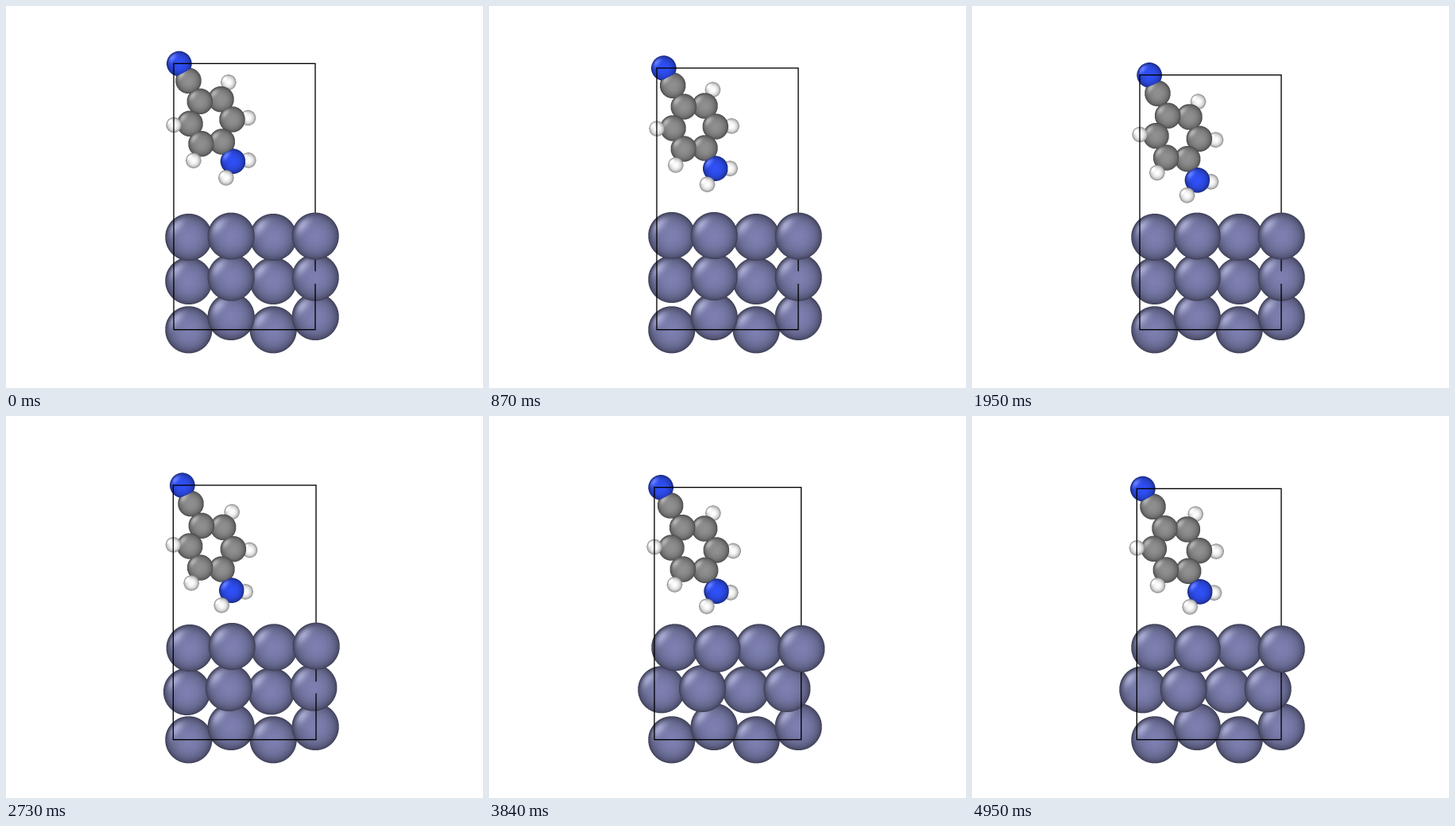
Animation, 600 px wide and 480 px high, one loop 5.01 s. Source, as a matplotlib script:

```python
import numpy as np
import matplotlib.pyplot as plt
from matplotlib.animation import FuncAnimation

W, H, DPI = 600, 480, 100
FRAMES, LAST = 167, 165
SS = 3                                # supersampling
X0, Y0, RW, RH = 170, 45, 270, 405    # region the model can reach

LIGHT = np.array([-1.8, -1.5, -0.2])
LIGHT /= np.linalg.norm(LIGHT)


def make_ball(r, rgb):
    """Shaded sphere: depth bump and colour on the fine grid."""
    n = int(r * SS) + 1
    v = np.arange(-n, n + 1) / (r * SS)
    x, y = np.meshgrid(v, v)
    d2 = x * x + y * y
    nz = np.sqrt(np.clip(1 - d2, 0, 1))
    facing = x * LIGHT[0] + y * LIGHT[1] + nz * LIGHT[2]
    spec = 0.25 * np.clip(2 * facing * nz - LIGHT[2], 0, 1) ** 6
    col = np.array(rgb) / 255 * (0.4 + 0.6 * nz)[..., None] + spec[..., None]
    depth = np.where(d2 <= 1, nz * r, -np.inf)
    return n, depth.astype("f4"), np.clip(col, 0, 1).astype("f4")


BALLS = {
    "M": make_ball(29.6, (125, 128, 176)),
    "C": make_ball(16.3, (144, 144, 144)),
    "N": make_ball(15.8, (48, 80, 248)),
    "H": make_ball(9.7, (255, 255, 255)),
}


def smooth(t, start, stop):
    u = np.clip((t - start) / (stop - start), 0, 1)
    return u * u * (3 - 2 * u)


def bump(t, mid, width):
    return np.exp(-((t - mid) / width) ** 2)


def build_molecule():
    """Atoms as (kind, along axis, across ring, wag), lengths in angstrom."""
    parts = [("N", -4, 0, 0), ("C", -2.83, 0, 0), ("N", 2.77, 0, 0),
             ("H", 3.3, 0.87, 1), ("H", 3.3, -0.87, 1)]
    for k in range(6):
        a, p = -np.cos(k * np.pi / 3), np.sin(k * np.pi / 3)
        parts.append(("C", 1.4 * a, 1.4 * p, 0))
        if k % 3:
            parts.append(("H", 2.46 * a, 2.46 * p, 0))
    return parts


MOLECULE = build_molecule()
KINDS = [m[0] for m in MOLECULE]
LOCAL = np.array([(1, *m[1:]) for m in MOLECULE])
MOL_Z = -60 - 8.4 * LOCAL[:, 2] + 1.5 * abs(LOCAL[:, 1])

# Poses: ring centre, then the screen vectors of axis, ring width and wag
START = np.array([(257.7, 144.9), (10, 18.1), (16.1, -12.6), (0, 0)])
MIDDLE = np.array([(258.6, 164.8), (8.9, 19.5), (17.25, -9.7), (-2.6, 0)])
END = np.array([(257.2, 167.8), (10.6, 19.1), (17.3, -10), (-3, 0)])


def slide(t):
    return 0.78 * smooth(t, 82, 114) + 0.22 * smooth(t, 105, 165)


def molecule(t):
    drop = smooth(t, 14, 50)
    sink = np.clip((t - 86) / 64, 0, 1)
    pose = START + drop * (MIDDLE - START) + (END - MIDDLE) * (slide(t), sink)
    return LOCAL @ pose


def slab(t):
    """Three layers of four; odd columns stand nearer and a little higher."""
    settle = smooth(t, 95, 135)
    heave = 3 * bump(t, 105, 12) - 2.2 * bump(t, 35, 20)
    for k in range(4):
        near = k % 2
        x, z = 229.8 + 53.05 * k, -31 * (1 - near)
        lift = heave * 0.4 ** k
        yield "M", x, 406.8 - 16.4 * near, z - 50
        yield ("M", x - 16 * slide(t) + settle * (0.7 - 1.5 * near),
               345.5 - 4.5 * near + lift + settle * (3.5 * near - 2), z - 28.5)
        yield ("M", x + 5.2 * bump(t, 116.5, 21),
               290.5 - 1.5 * near + lift + 3.7 * settle * near, z)


def atoms(t):
    mol = [(k, x, y, z) for k, (x, y), z in zip(KINDS, molecule(t), MOL_Z)]
    return list(slab(t)) + mol


def sub(x, y):
    return round((x - X0) * SS), round((y - Y0) * SS)


def render(t):
    col = np.ones((RH * SS, RW * SS, 3), "f4")
    zbuf = np.full(col.shape[:2], -1e4, "f4")
    model = atoms(t)
    for kind, x, y, z in model:
        n, depth, rgb = BALLS[kind]
        i, j = sub(x, y)
        win = np.s_[j - n:j + n + 1, i - n:i + n + 1]
        d = depth + z
        hit = d > zbuf[win]
        zbuf[win][hit] = d[hit]
        col[win][hit] = rgb[hit]

    # Cell outline: bounds of the atom centres, at the depth of the front plane
    xs, ys = [a[1] for a in model], [a[2] for a in model]
    l, u = sub(min(xs), min(ys))
    r, b = sub(max(xs), max(ys))
    for win in (np.s_[u - 2:u + 2, l - 2:r + 2], np.s_[b - 2:b + 2, l - 2:r + 2],
                np.s_[u - 2:b + 2, l - 2:l + 2], np.s_[u - 2:b + 2, r - 2:r + 2]):
        col[win][zbuf[win] < 0] = 0
    return sum(col[i::SS, j::SS] for i in range(SS) for j in range(SS)) / SS**2


fig = plt.figure(figsize=(W / DPI, H / DPI), dpi=DPI, facecolor="white")
ax = fig.add_axes([0, 0, 1, 1])
view = ax.imshow(render(0), extent=(X0, X0 + RW, Y0 + RH, Y0),
                 interpolation="nearest", aspect="auto", vmin=0, vmax=1)
ax.set_xlim(0, W)
ax.set_ylim(H, 0)
ax.axis("off")


def update(i):
    view.set_data(np.clip(render(min(i, LAST)), 0, 1))
    return [view]


anim = FuncAnimation(fig, update, frames=FRAMES, interval=30, repeat=True,
                     repeat_delay=0)
plt.show()
```
